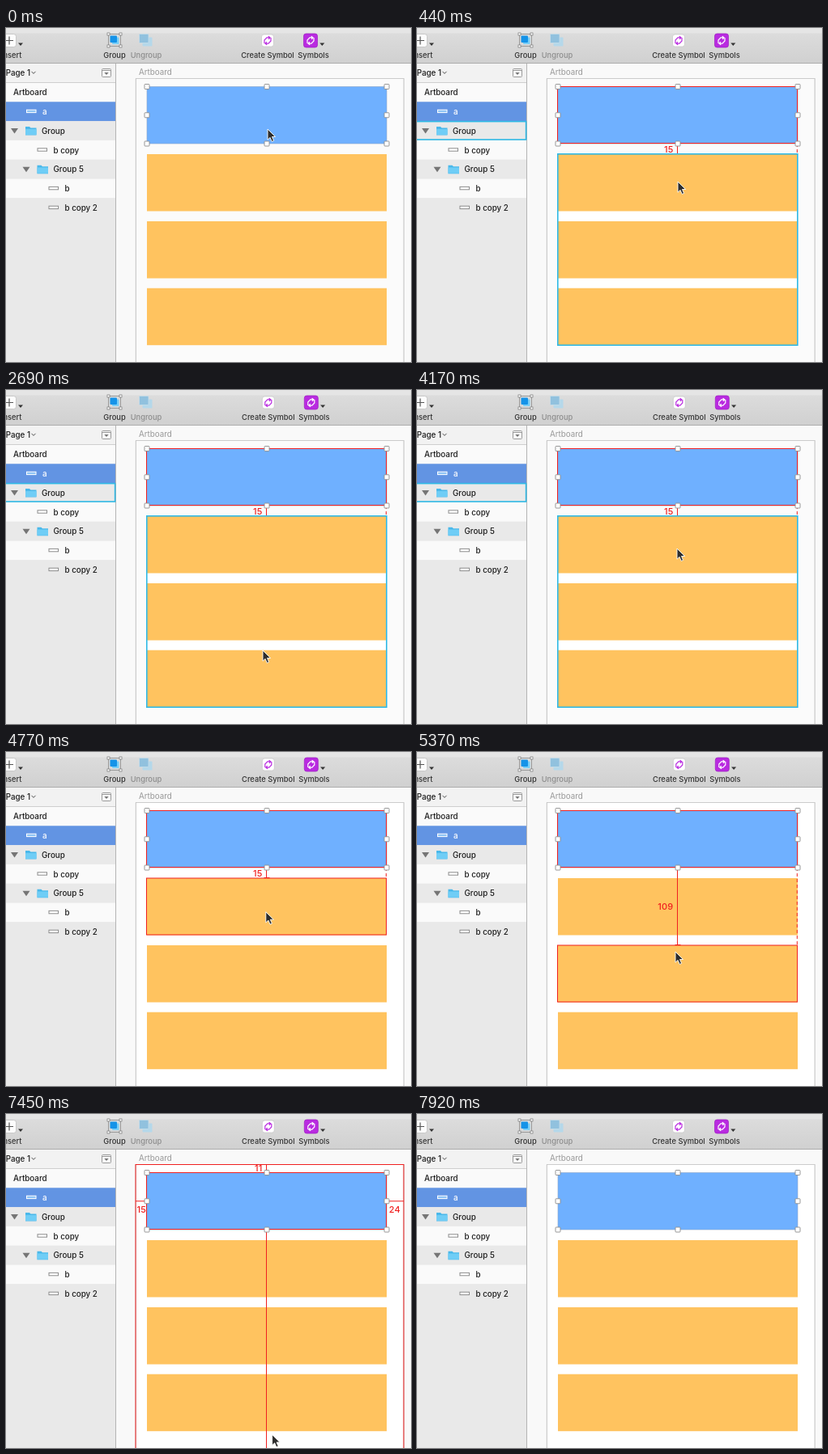
Animation of 500x413 px, one loop 8020 ms. Source, as an HTML page:

```html
<!DOCTYPE html>
<html lang="en">
<head>
<meta charset="utf-8">
<title>Measuring layers</title>
<style>
  html, body { margin: 0; width: 100%; height: 100%; overflow: hidden; background: #f9f9f9; }
  svg { display: block; width: 100%; height: 100%; }
  text { font: 500 9.8px Inter, Roboto, sans-serif; fill: #1c1c1c; }
  .tool { font-size: 9.3px; fill: #333; text-anchor: middle; }
  .measure { font-size: 11px; fill: #f02020; text-anchor: end; letter-spacing: .2px; }
  .red { fill: none; stroke: #f02020; stroke-width: 1; }
  .hover { fill: none; stroke: #2fb9e6; stroke-width: 1.6; }
</style>
</head>
<body>
<svg id="stage" viewBox="0 0 500 413"></svg>
<script>
const LOOP = 8020;
const BOX = { x: 174, w: 296, h: 70.5 };
const MID = BOX.x + BOX.w / 2 - .5;
const RIGHT = BOX.x + BOX.w;
const TOP = 72.5, BASE = TOP + BOX.h;
const TARGETS = [156, 239, 321.7];
const GAPS = [15, 109, 203];
const CMD_FROM = 4320, WHITE_FROM = 4770, ALT_UNTIL = 7600;

// Pointer moves: first step, last step, number of steps, end x, end y
const MOVES = [
  [140, 440, 3, 322, 190],
  [890, 1190, 3, 316, 247],
  [1340, 1490, 2, 315, 241],
  [2090, 2540, 4, 317, 327],
  [2690, 2690, 1, 317, 322],
  [3590, 4170, 5, 321, 196],
  [4320, 4320, 1, 321, 192],
  [4770, 5370, 5, 319, 247],
  [5520, 5520, 1, 319, 252],
  [5970, 6560, 5, 326, 331],
  [7010, 7600, 5, 330, 432]
];

const rect = (x, y, w, h, attrs) =>
  `<rect x="${x}" y="${y}" width="${w}" height="${h}" ${attrs}/>`;
const path = (d, attrs) => `<path d="${d}" ${attrs}/>`;
const text = (x, y, s, attrs = '') => `<text x="${x}" y="${y}" ${attrs}>${s}</text>`;
const caret = (x, y) => path(`M${x} ${y}h6l-3 3.6z`, 'fill="#333"');
const outline = y => rect(BOX.x - .5, y, BOX.w, BOX.h - .5, 'class="red"');

const layerIcon = (x, y, picked) =>
  rect(x + .5, y - 1.8, 11.5, 3.4, picked
    ? 'fill="#8fc4f5" stroke="#fff"'
    : 'fill="#fff" stroke="#8c8c8c"');

function folder(x, y) {
  return path(`M${x} ${y - 5}h5l1.5 1.5h7v9h-13.5z`, 'fill="#4ab8ea"') +
    rect(x, y - 2.2, 13.5, 7.2, 'rx=".6" fill="#6fcdf6"') +
    path(`M${x - 18} ${y - 3}h9l-4.5 6.5z`, 'fill="#757575"');
}

function row(i, x, label, isFolder) {
  const y = 79.5 + i * 23.8, picked = i === 1;
  const bg = picked ? '#6294e3' : i % 2 || !i ? '#fafafa' : '#e9e9e9';
  const icon = !i ? '' : isFolder ? folder(x - 20, y) : layerIcon(x - 20, y - .3, picked);
  return rect(0, y - 12, 135, 24, `fill="${bg}"`) + icon +
    text(x, y + 3.6, label, picked ? 'style="fill:#fff"' : '');
}

function swapIcon(x, y, size, bg, ink) {
  const c = size / 2;
  return rect(x, y, size, size, `rx="3" fill="${bg}" stroke="${ink === '#fff' ? '#9c1cc0' : '#c4c4c4'}" stroke-width=".7"`) +
    `<g transform="translate(${x + c} ${y + c})" fill="none" stroke="${ink}" stroke-width="1.2">` +
    path('M-4 3.6V-.5L-1-3.6H3M.8-5.2 3-3.6 1.2-1.6', '') +
    path('M4-3.6V.5L1 3.6H-3M-.8 5.2-3 3.6-1.2 1.6', '') + '</g>';
}

function groupIcon() {
  let s = rect(126.5, 7.5, 15, 15, 'fill="none" stroke="#8a8a8a" stroke-width=".8"') +
    rect(131, 11.5, 8.5, 8.5, 'rx="1" fill="#78cff8"') +
    rect(128.5, 9.5, 8.5, 8.5, 'rx="1" fill="#1593e8"');
  for (const x of [125, 140]) for (const y of [6, 21])
    s += rect(x, y, 3, 3, 'fill="#fff" stroke="#777" stroke-width=".7"');
  return s;
}

function toolbar() {
  return rect(0, 0, 500, 44, 'fill="url(#bar)"') +
    rect(0, 0, 500, 6.5, 'fill="#e5e5e5"') +
    rect(0, 43, 500, 1, 'fill="#adadad"') +
    rect(-6, 7.5, 18.5, 16, 'rx="3" fill="#fcfcfc" stroke="#bbb" stroke-width=".7"') +
    path('M4 10.5v10M-1 15.5H9', 'stroke="#555" stroke-width="1.2"') +
    caret(15, 18.5) +
    text(19.5, 37, 'Insert', 'class="tool" style="text-anchor:end"') +
    groupIcon() + text(134, 37, 'Group', 'class="tool"') +
    rect(168.5, 11.5, 12, 11, 'rx="1" fill="#b5d8ea"') +
    rect(164.5, 7.5, 11.5, 11, 'rx="1" fill="#91c1de" stroke="#c8dfea" stroke-width=".8"') +
    text(173, 37, 'Ungroup', 'class="tool" style="fill:#8d8d8d"') +
    '<g id="symbols">' +
    swapIcon(315.5, 8, 15, '#fff', '#b92be0') + text(323, 37, 'Create Symbol', 'class="tool"') +
    swapIcon(367.5, 7, 17, '#b92be0', '#fff') + text(379.5, 37, 'Symbols', 'class="tool"') +
    caret(387.3, 18.5) + '</g>';
}

function sidebar() {
  return rect(0, 44, 135, 369, 'fill="#e9e9e9"') +
    rect(0, 44, 135, 23, 'fill="#f2f2f2"') +
    text(30, 58.8, 'Page 1', 'text-anchor="end"') +
    path('M31.5 53.8l2.5 2.6 2.5-2.6', 'fill="none" stroke="#555"') +
    rect(118.5, 50.5, 11, 10, 'rx="1" fill="#fafafa" stroke="#999"') +
    path('M119 52.5h10', 'stroke="#999"') +
    path('M121.3 55h5.4l-2.7 3z', 'fill="#777"') +
    row(0, 9, 'Artboard') + row(1, 45, 'a') +
    row(2, 44, 'Group', true) + row(3, 58.5, 'b copy') +
    row(4, 58.5, 'Group 5', true) + row(5, 72.5, 'b') + row(6, 72.5, 'b copy 2') +
    rect(0, 67, 135, 1, 'fill="#cfcfcf"') +
    rect(135, 44, 1, 369, 'fill="#b4b4b4"');
}

function handles() {
  let s = '';
  for (const x of [BOX.x, MID + .5, RIGHT])
    for (const y of [TOP, TOP + BOX.h / 2, BASE])
      if (x !== MID + .5 || y !== TOP + BOX.h / 2)
        s += rect(x - 3, y - 3, 6, 6, 'rx=".8" fill="#fff" stroke="#8d8d8d" stroke-width=".9"');
  return s;
}

// Distance from the selected layer down to y
function measure(y, label) {
  return path(`M${MID} ${BASE}V${y}M${MID - 3} ${y - .5}h7`, 'class="red"') +
    path(`M${RIGHT - .7} ${BASE}V${y}`, 'class="red" stroke-dasharray="4 3"') +
    text(316.5, (BASE + y) / 2 + 4, label, 'class="measure"');
}

function measureArtboard() {
  const cy = TOP + BOX.h / 2;
  return rect(160, 62.5, 331, 400, 'class="red"') +
    path(`M${MID} 63V${TOP}M${MID} ${BASE}V420M160 ${cy}H${BOX.x}M${RIGHT} ${cy}H491`, 'class="red"') +
    text(316.5, 71, 11, 'class="measure"') +
    text(173, cy + 14, 15, 'class="measure"') +
    text(487, cy + 14, 24, 'class="measure"');
}

const stage = document.getElementById('stage');
stage.innerHTML =
  '<defs><linearGradient id="bar" x2="0" y2="1"><stop stop-color="#dedede"/>' +
  '<stop offset="1" stop-color="#d0d0d0"/></linearGradient></defs>' +
  rect(0, 0, 500, 413, 'fill="#f9f9f9"') +
  text(164, 57.6, 'Artboard', 'style="fill:#989898;font-weight:400"') +
  rect(159.5, 62, 332.5, 400, 'rx="1" fill="#e2e2e2"') +
  rect(160.5, 62.5, 330.5, 400, 'id="board" stroke="#c4c4c4" stroke-width=".8"') +
  rect(BOX.x, TARGETS[0], BOX.w, 236, 'id="backing" fill="#fff"') +
  TARGETS.map(y => rect(BOX.x, y, BOX.w, BOX.h, 'fill="#ffc35f"')).join('') +
  rect(BOX.x, TOP, BOX.w, BOX.h, 'fill="#6fb0ff" stroke="#8aa6c8" stroke-width=".6"') +
  toolbar() + sidebar() +
  '<g id="marks"></g>' + handles() +
  path('M0 0V13.2L3.1 10.4 5.2 15.4 7.6 14.4 5.5 9.5H9.6Z',
    'id="pointer" fill="#2d2d2d" stroke="#fff" stroke-width=".9"');

const [board, backing, symbols, marks, pointer] =
  ['board', 'backing', 'symbols', 'marks', 'pointer'].map(id => document.getElementById(id));

const ease = p => p * p * (3 - 2 * p);

function pointerAt(t) {
  let x = 323, y = 125;
  for (const [start, end, n, tx, ty] of MOVES) {
    if (t < start) break;
    const gap = n > 1 ? (end - start) / (n - 1) : 1;
    const step = Math.min(n, Math.floor((t - start) / gap + 1e-6) + 1);
    const p = ease(step / n);
    x += (tx - x) * p;
    y += (ty - y) * p;
  }
  return { x, y };
}

function marksAt(t, y) {
  if (t >= ALT_UNTIL || y < TARGETS[0]) return '';
  const own = outline(TOP);
  if (t < CMD_FROM)
    return own + measure(TARGETS[0], GAPS[0]) +
      rect(173.8, 155.8, 296, 236.4, 'class="hover"') +
      rect(-2, 115.6, 136.6, 22.4, 'class="hover"');
  const i = TARGETS.findIndex(top => y >= top && y < top + BOX.h);
  return own + (i < 0 ? measureArtboard() : outline(TARGETS[i]) + measure(TARGETS[i], GAPS[i]));
}

let shown = null;
function draw(t) {
  const { x, y } = pointerAt(t);
  const next = marksAt(t, y);
  if (next !== shown) marks.innerHTML = shown = next;
  pointer.setAttribute('transform', `translate(${x} ${y})`);
  board.setAttribute('fill', t < WHITE_FROM ? '#fbfbfb' : '#fff');
  backing.setAttribute('visibility', t < 290 ? 'hidden' : 'visible');
  symbols.setAttribute('transform', `translate(${t >= 890 && t < 7920 ? .8 : 0} 0)`);
}

const begin = performance.now();
function tick() {
  draw((performance.now() - begin) % LOOP);
  requestAnimationFrame(tick);
}
tick();
</script>
</body>
</html>
```
